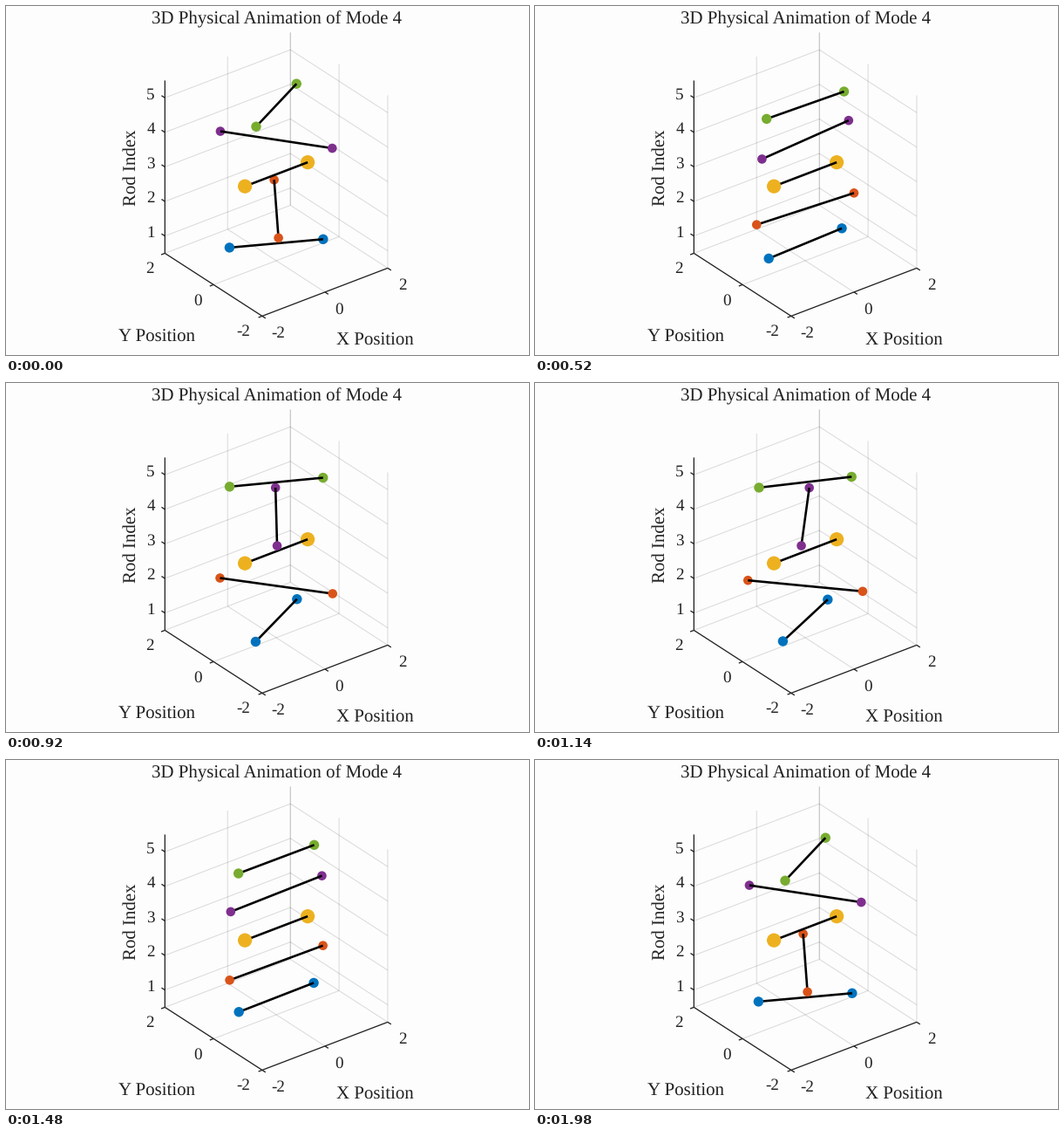
Recreate the animation shown at these times as a matplotlib script. Size 600 px wide and 400 px high, loop 2000 ms.

```python
import numpy as np
import matplotlib.pyplot as plt
from matplotlib.animation import FuncAnimation
from matplotlib.patches import Circle

W, H, DPI = 600, 400, 100
FRAMES, LOOP = 100, 2000
PX = 72 / DPI  # one pixel in points
INK = "#212121"

# Orthographic projection: screen position of the floor centre and axis units
FLOOR = np.array([310.1, 291.9])
UX, UY, UZ = np.array([[36.0, -13.75], [-27.9, -18.0], [0.0, -39.6]])
Z_MIN, Z_MAX = 0.5, 5.5

# Rods from bottom to top
LENGTHS = [1.2, 1.47, 1.0, 1.47, 1.2]
RADII = [5.7, 5.3, 8.1, 5.3, 5.7]
COLORS = ["#0072BD", "#D95319", "#EDB120", "#7E2F8E", "#77AC30"]
MODE = np.array([-1, 2, 0, -2, 1]) / np.sqrt(10)
SCALE = 1.5

plt.rcParams.update({"font.family": "Liberation Serif", "text.hinting": "none",
                     "path.snap": False})
fig = plt.figure(figsize=(W / DPI, H / DPI), dpi=DPI, facecolor="#fdfdfd")
ax = fig.add_axes([0, 0, 1, 1])
ax.set(xlim=(0, W), ylim=(H, 0))
ax.axis("off")


def project(x, y, z):
    return FLOOR + x * UX + y * UY + (z - Z_MIN) * UZ


def segment(p, q, **style):
    ax.plot(*np.transpose([p, q]), solid_capstyle="butt", **style)


def grid(*points):
    for p, q in zip(points, points[1:]):
        segment(project(*p), project(*q), color="#262626", alpha=0.15,
                lw=1.1 * PX, zorder=1)


def edge(p, q):
    segment(p, q, color=INK, lw=1.3 * PX, zorder=2)


def tick(point, direction):
    p = project(*point)
    edge(p, p + 4.6 * direction / np.hypot(*direction))


def label(x, y, text, size=19, **kw):
    ax.text(x, y, text, fontsize=size * PX, color=INK, ha="center",
            va="baseline", **kw)


def draw_axes():
    for v in (-2, 0, 2):
        if v > -2:
            grid((v, -2, Z_MIN), (v, 2, Z_MIN))
            grid((v, 2, Z_MIN), (v, 2, Z_MAX))
            grid((-2, v, Z_MIN), (2, v, Z_MIN))
        grid((2, v, Z_MIN), (2, v, Z_MAX))
        tick((v, -2, Z_MIN), -UY)
        tick((-2, v, Z_MIN), -UX)
    for z in range(1, 6):
        grid((-2, 2, z), (2, 2, z), (2, -2, z))
        tick((-2, 2, z), UY)
        label(166, 304.9 - 39.7 * z, str(z))

    front = project(-2, -2, Z_MIN)
    left = project(-2, 2, Z_MIN)
    edge(front, project(2, -2, Z_MIN))
    edge(front, left)
    edge(left, project(-2, 2, Z_MAX))

    for x, y, text in [(165, 306.5, "2"), (220, 342.5, "0"),
                       (272.5, 378.5, "-2"), (312.5, 380.5, "-2"),
                       (382.5, 352.5, "0"), (454.5, 325, "2")]:
        label(x, y, text)
    label(310.8, 20, "3D Physical Animation of Mode 4", 20.9)
    label(172.8, 384.6, "Y Position", 20.9)
    label(423.5, 389, "X Position", 20.9)
    label(148.6, 185, "Rod Index", 20.9, rotation=90, rotation_mode="anchor")


def make_rod(color, radius):
    bar, = ax.plot([], [], color="black", lw=2.6 * PX, solid_capstyle="butt")
    ends = [ax.add_patch(Circle((0, 0), radius, color=color, lw=0))
            for _ in range(2)]
    return bar, ends


def update(i):
    swing = np.cos(2 * np.pi * i / (FRAMES - 1))
    artists = []
    for k, (bar, ends) in enumerate(rods):
        z = k + 1
        angle = SCALE * MODE[k] * swing
        x, y = LENGTHS[k] * np.cos(angle), LENGTHS[k] * np.sin(angle)
        depth = 0.61 * x + 0.79 * y
        points = [project(s * x, s * y, z) for s in (-1, 1)]
        bar.set_data(*np.transpose(points))
        bar.set_zorder(10 * z + 1)
        # The far marker lies under the bar, the near one over it
        for s, end, p in zip((-1, 1), ends, points):
            end.center = p
            end.set_zorder(10 * z + (0 if s * depth > 0 else 2))
        artists += [bar, *ends]
    return artists


draw_axes()
rods = [make_rod(c, r) for c, r in zip(COLORS, RADII)]
anim = FuncAnimation(fig, update, frames=FRAMES, interval=LOOP / FRAMES,
                     repeat=True, repeat_delay=0, blit=False)
plt.show()
```
